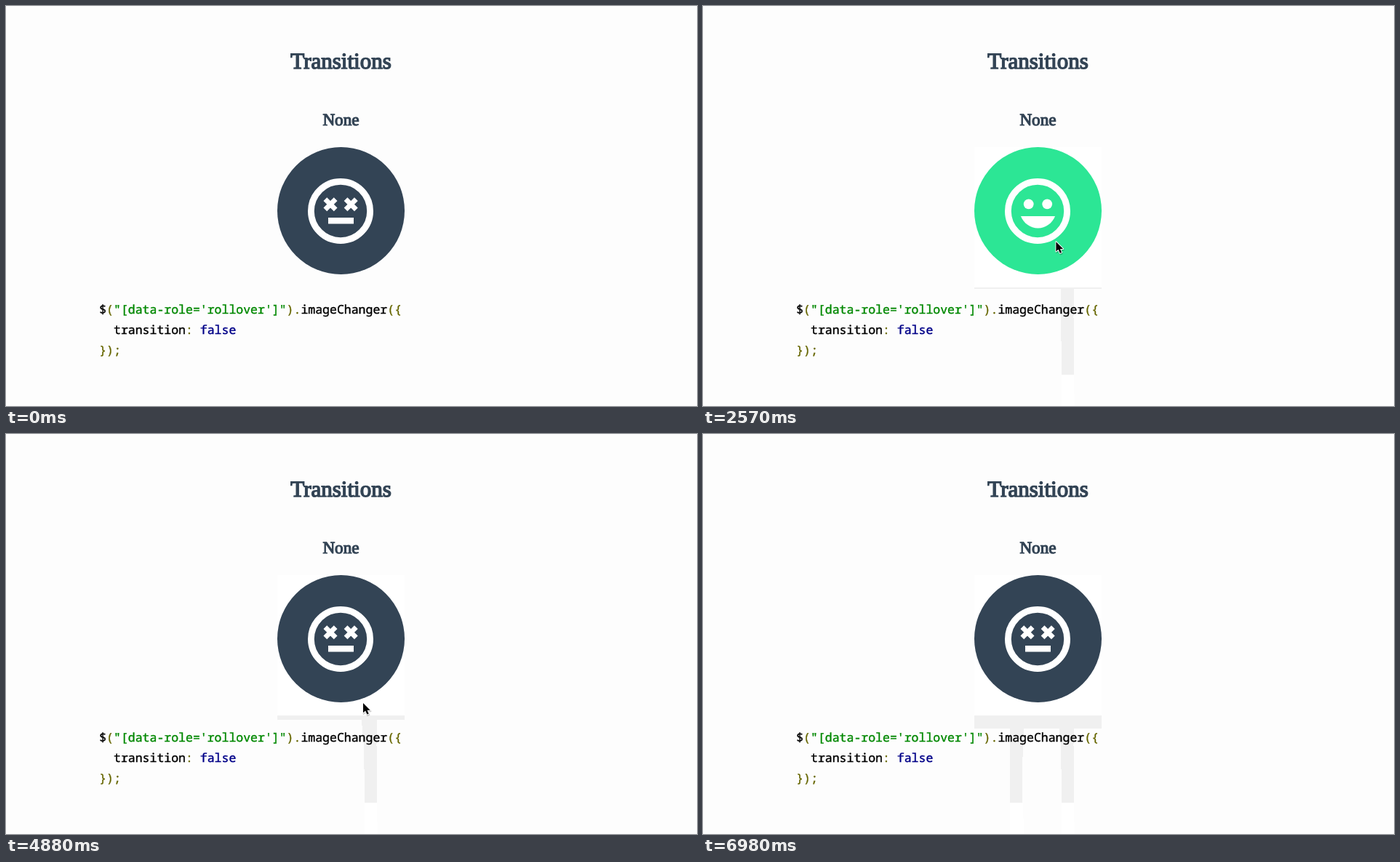
These frames come from a looping animation (950 by 550 pixels, 8.23 s). An HTML page:

```html
<!DOCTYPE html>
<html lang="en">
<head>
<meta charset="utf-8">
<title>Transitions</title>
<style>
  html, body { margin: 0; width: 100%; height: 100%; overflow: hidden; background: #fdfdfd; }
  svg { display: block; width: 950px; height: 550px; }
  text { text-rendering: geometricPrecision; }
  .head { font-family: "Liberation Serif", serif; text-anchor: middle; fill: #345; stroke: #345; }
  .code { font: 16.5px "Noto Sans Mono", monospace; stroke-width: .4; }
  .pln { fill: #000; stroke: #000; }
  .pun { fill: #660; stroke: #660; }
  .str { fill: #080; stroke: #080; }
  .kwd { fill: #008; stroke: #008; }
</style>
</head>
<body>
<svg viewBox="0 0 950 550">
  <defs>
    <clipPath id="panel"><rect x="0" y="387" width="950" height="120"/></clipPath>
    <path id="arrow" d="M0 0V13.4L3.1 10.6L5.4 15.6L7.7 14.7L5.6 9.8H9.7Z"/>
    <path id="cross" d="M-7.15 -7.15L7.15 7.15M7.15 -7.15L-7.15 7.15" stroke="#fff" stroke-width="6.75"/>
  </defs>
  <rect width="950" height="550" fill="#fdfdfd"/>
  <path id="trail" fill="#fff"/>
  <path id="trailPanel" fill="#f0f0f0" clip-path="url(#panel)"/>

  <text class="head" x="460.5" y="86" font-size="31" stroke-width="1.5">Transitions</text>
  <text class="head" x="460.5" y="164" font-size="23.2" stroke-width="1.2">None</text>

  <circle id="disc" cx="460.5" cy="281.5" r="87.5"/>
  <circle cx="460" cy="282" r="40.6" fill="none" stroke="#fff" stroke-width="8.8"/>
  <g id="dead">
    <use href="#cross" x="446" y="272.7"/>
    <use href="#cross" x="474.2" y="272.7"/>
    <rect x="443" y="291" width="35" height="8.5" fill="#fff"/>
  </g>
  <g id="happy" fill="#fff">
    <circle cx="447.7" cy="272.3" r="6.9"/>
    <circle cx="473.2" cy="272.3" r="6.9"/>
    <path d="M437 289H484C480.4 298.5 471 305.5 460.5 305.5S440.6 298.5 437 289Z"/>
  </g>

  <g class="code">
    <text class="pln" x="128.2" y="423">$<tspan class="pun">(</tspan><tspan class="str">"[data-role='rollover']"</tspan><tspan class="pun">).</tspan>imageChanger<tspan class="pun">({</tspan></text>
    <text class="pln" x="148" y="451">transition<tspan class="pun">:</tspan></text>
    <text class="kwd" x="266.8" y="451">false</text>
    <text class="pun" x="128.2" y="479">});</text>
  </g>

  <g id="cursor">
    <use href="#arrow" x=".6" y="1.4" opacity=".2" stroke="#000" stroke-width="2.2" stroke-linejoin="round"/>
    <use href="#arrow" stroke="#fff" stroke-width="1.8" stroke-linejoin="round"/>
    <use href="#arrow"/>
  </g>
</svg>
<script>
const LOOP = 8230;
const STEP = 57.5;
const HOVER_EDGE = 368.3;
const $ = id => document.getElementById(id);

// Pointer strokes: cubic Bezier curves run through at an even pace
const strokes = [
  { from: 1140, to: 1950, via: [[496, 500], [495, 440]], end: [494.5, 406] },
  { from: 2000, to: 2920, via: [[500, 330], [476, 309.5]], end: [476.5, 309.5] },
  { from: 3220, to: 4120, via: [[495, 323.7], [492, 412]], end: [492.5, 404] },
  { from: 4540, to: 5690, via: [[499.5, 362], [464.7, 298.5]], end: [458.5, 309] },
  { from: 6050, to: 6980, via: [[420, 295], [423, 445]], end: [426, 552] }
];

const bezier = (a, b, c, d, u) => {
  const v = 1 - u;
  return a * v ** 3 + 3 * b * v * v * u + 3 * c * v * u * u + d * u ** 3;
};

const makePose = (t, x, y) => ({ t, x, y, happy: y < HOVER_EDGE, trail: "" });

const box = (x0, y0, x1, y1) =>
  `M${Math.round(x0)} ${Math.round(y0)}H${Math.round(x1)}V${Math.round(y1)}H${Math.round(x0)}Z`;

// Each step repaints the pointer's old and new place, plus the image when it swaps
function repaint(p, q) {
  const bottom = Math.max(p.y, q.y) + 20;
  const left = Math.min(p.x, q.x) - 2.5;
  const right = Math.max(p.x, q.x) + 14.5;
  const swap = p.happy === q.happy ? "" : box(373, 194, 548, bottom);
  return box(left, Math.min(p.y, q.y) - 2, right, bottom) + swap;
}

const poses = [makePose(0, 496, 552)];
let origin = [496, 545];
for (const { from, to, via: [b, c], end } of strokes) {
  const n = Math.round((to - from) / STEP);
  for (let i = 0; i <= n; i++) {
    const u = i / n;
    const [x, y] = [0, 1].map(k => bezier(origin[k], b[k], c[k], end[k], u));
    const pose = makePose(Math.floor(from + (to - from) * u), x, y);
    const last = poses[poses.length - 1];
    pose.trail = last.trail + repaint(last, pose);
    poses.push(pose);
  }
  origin = end;
}

const show = (id, on) => $(id).setAttribute("display", on ? "inline" : "none");

function draw(t) {
  const { x, y, happy, trail } = poses.filter(p => p.t <= t).pop();
  $("trail").setAttribute("d", trail);
  $("trailPanel").setAttribute("d", trail);
  $("disc").setAttribute("fill", happy ? "#2ce695" : "#345");
  show("dead", !happy);
  show("happy", happy);
  show("cursor", y < 550);
  $("cursor").setAttribute("transform", `translate(${x} ${y})`);
}

let start;
function tick(now) {
  start ??= now;
  draw((now - start) % LOOP);
  requestAnimationFrame(tick);
}
draw(0);
requestAnimationFrame(tick);
</script>
</body>
</html>
```
